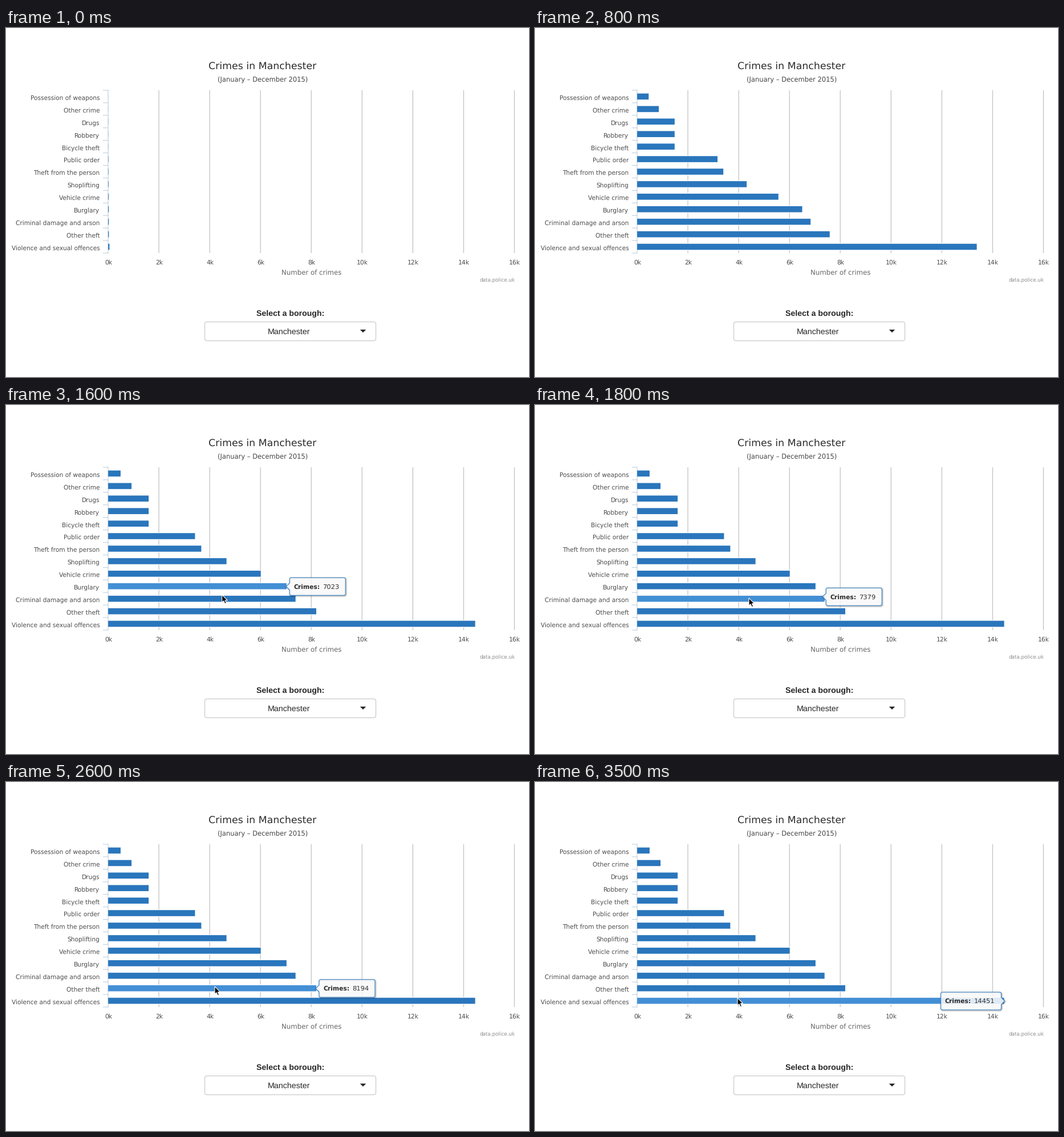
Animation of 917x611 px, one loop 3600 ms. Source, as a matplotlib script:

```python
import numpy as np
import matplotlib.pyplot as plt
from matplotlib.animation import FuncAnimation
from matplotlib.patches import FancyBboxPatch, PathPatch, Polygon, Rectangle
from matplotlib.path import Path

W, H, DPI = 917, 611, 100
STEP, FRAMES = 100, 36
PX = 72 / DPI

LEFT, TOP, BOTTOM = 179.5, 109, 394
UNIT = 89.06 / 2000
BLUE, LIGHT, AXIS = "#2a76bc", "#438fd5", "#c0d0e0"

CRIMES = [
    ("Possession of weapons", 490), ("Other crime", 920), ("Drugs", 1595),
    ("Robbery", 1595), ("Bicycle theft", 1595), ("Public order", 3420),
    ("Theft from the person", 3667), ("Shoplifting", 4660),
    ("Vehicle crime", 6010), ("Burglary", 7023),
    ("Criminal damage and arson", 7379), ("Other theft", 8194),
    ("Violence and sexual offences", 14451),
]
ROW = (BOTTOM - TOP) / len(CRIMES)
BAR_H = 10.6

# (time in ms, hovered row)
HOVERS = [(950, 8), (1010, 9), (1665, 10), (2250, 11), (3050, 12)]
MOUSE_T = [1000, 1200, 1650, 1800, 2250, 2600, 3050, 3500]
MOUSE_X = [386, 384, 378, 375, 370, 366, 358, 355]
MOUSE_Y = [308, 318.5, 334, 338, 355, 358, 377, 378]
ARROW = np.array([(0, 0), (0, 13.4), (3, 10.6), (5.3, 15.6), (7.6, 14.6),
                  (5.4, 9.7), (9.6, 9.7)])

plt.rcParams.update({"font.family": "DejaVu Sans", "text.hinting": "none",
                     "path.snap": False})
fig = plt.figure(figsize=(W / DPI, H / DPI), dpi=DPI, facecolor="white")
ax = fig.add_axes([0, 0, 1, 1])
ax.set(xlim=(0, W), ylim=(H, 0))
ax.axis("off")


def label(x, y, s, size, color, ha="center", **kw):
    return ax.text(x, y, s, fontsize=size * PX, color=color, ha=ha,
                   va="baseline", **kw)


def line(xs, ys, color, width, z):
    ax.plot(xs, ys, color=color, lw=width * PX, zorder=z,
            solid_capstyle="butt")


def row_y(i):
    return TOP + ROW * (i + 0.5)


def bar_end(i):
    return LEFT + CRIMES[i][1] * UNIT


def box_width(i):
    return 98 if CRIMES[i][1] < 10000 else 106


def flipped(i):
    return bar_end(i) + 5 + box_width(i) > 900


def tip_home(i):
    x = bar_end(i) + 5
    if flipped(i):
        x = bar_end(i) - 5 - box_width(i)
    return np.array([x, row_y(i) - 15])


def callout(x, y, w, to_right, h=31, r=3, a=6):
    """Rounded box with a pointer on one side."""
    x2, y2, m = x + w, y + h, y + h / 2
    verts = [(x + r, y), (x2 - r, y), (x2, y), (x2, y + r)]
    codes = [Path.MOVETO, Path.LINETO, Path.CURVE3, Path.CURVE3]
    if to_right:
        verts += [(x2, m - a), (x2 + a, m), (x2, m + a)]
        codes += [Path.LINETO] * 3
    verts += [(x2, y2 - r), (x2, y2), (x2 - r, y2),
              (x + r, y2), (x, y2), (x, y2 - r)]
    codes += [Path.LINETO, Path.CURVE3, Path.CURVE3] * 2
    if not to_right:
        verts += [(x, m + a), (x - a, m), (x, m - a)]
        codes += [Path.LINETO] * 3
    verts += [(x, y + r), (x, y), (x + r, y), (x + r, y)]
    codes += [Path.LINETO, Path.CURVE3, Path.CURVE3, Path.CLOSEPOLY]
    return Path(verts, codes)


# Titles and axes
label(450, 72.6, "Crimes in Manchester", 17.4, "#2b2b2b")
label(450.5, 94, "(January – December 2015)", 11.55, "#444444")
for k in range(9):
    gx = LEFT + k * 89.06
    if k:
        line([gx - 0.5] * 2, [TOP, BOTTOM], "#c3c3c3", 1.3, 1)
    label(gx, 413.8, f"{2 * k}k", 10.7, "#4d4d4d")
label(535.5, 432, "Number of crimes", 11.7, "#666666")
label(892, 444, "data.police.uk", 8.75, "#8c8c8c", "right")

line([LEFT - 0.5] * 2, [TOP - 0.5, BOTTOM + 0.5], AXIS, 1.1, 2)
for i in range(len(CRIMES) + 1):
    line([170, LEFT], [TOP + i * ROW] * 2, AXIS, 1.1, 2)
for i, (name, _) in enumerate(CRIMES):
    label(164.5, row_y(i) + 5.6, name, 10.62, "#4d4d4d", "right")

# Drop-down
label(498.5, 504, "Select a borough:", 14.1, "#262626",
      family="Liberation Sans", weight="bold")
ax.add_patch(FancyBboxPatch((352.5, 518.5), 292, 25,
                            boxstyle="round,pad=4,rounding_size=4",
                            fc="white", ec="#cccccc", lw=1.3 * PX))
label(496.5, 536.2, "Manchester", 14.3, "#262626", family="Liberation Sans")
ax.add_patch(Polygon([(620.8, 528), (631.2, 528), (626, 533.2)],
                     fc="#262626", ec="none"))

# Moving parts
bars, halos = [], []
for i in range(len(CRIMES)):
    y = row_y(i) - BAR_H / 2
    halos.append(ax.add_patch(Rectangle((LEFT, y - 1.2), 0, BAR_H + 2.4,
                                        fc="white", ec="none", zorder=1.5)))
    bars.append(ax.add_patch(Rectangle((LEFT - 0.4, y), 0, BAR_H, fc=BLUE,
                                       ec="none", zorder=3)))

blank = callout(0, 0, 98, False)
shadows = [ax.add_patch(PathPatch(blank, fc="none", ec="black", zorder=5,
                                  alpha=alpha, lw=width * PX))
           for width, alpha in ((5, 0.05), (3, 0.1), (1, 0.15))]
tip_fill = ax.add_patch(PathPatch(blank, fc="#f9f9f9", ec="none", alpha=0.87,
                                  zorder=6))
tip_edge = ax.add_patch(PathPatch(blank, fc="none", ec="#3580c2",
                                  lw=1.1 * PX, zorder=6.1))
tip_key = label(0, 0, "Crimes:", 10.75, "#2b2b2b", "left", weight="bold",
                zorder=7)
tip_num = label(0, 0, "", 11.5, "#333333", "left", zorder=7)
mouse = ax.add_patch(Polygon(ARROW, fc="black", ec="white", lw=1.1 * PX,
                             joinstyle="miter", zorder=9))
tip_parts = [*shadows, tip_fill, tip_edge, tip_key, tip_num, mouse]


def growth(t):
    p = min(1, 0.038 + t / 1018)
    return 0.5 - np.cos(np.pi * p) / 2


def tip_at(t):
    """Hovered row and eased box corner."""
    pos = row = since = None
    for start, i in HOVERS:
        if t < start:
            break
        if row is None:
            pos = tip_home(i)
        else:
            pos = tip_home(row)
        row, since = i, start
    if row is None:
        return None, None
    left = (2 / 3) ** ((t - since) / 32)
    return row, tip_home(row) + (pos - tip_home(row)) * left


def update(n):
    t = n * STEP
    g = growth(t)
    row, corner = tip_at(t)
    for i, (bar, halo) in enumerate(zip(bars, halos)):
        w = CRIMES[i][1] * UNIT * g
        bar.set_width(w)
        halo.set_width(w + 0.8)
        bar.set_facecolor(LIGHT if i == row else BLUE)
    for part in tip_parts:
        part.set_visible(row is not None)
    if row is not None:
        x, y = corner
        w, side = box_width(row), flipped(row)
        for s in shadows:
            s.set_path(callout(x + 1, y + 1, w, side))
        shape = callout(x, y, w, side)
        tip_fill.set_path(shape)
        tip_edge.set_path(shape)
        tip_key.set_position((x + 7.5, y + 19.3))
        tip_num.set_position((x + 58, y + 19.3))
        tip_num.set_text(str(CRIMES[row][1]))
        mouse.set_xy(ARROW + (np.interp(t, MOUSE_T, MOUSE_X),
                              np.interp(t, MOUSE_T, MOUSE_Y)))
    return [*bars, *halos, *tip_parts]


anim = FuncAnimation(fig, update, frames=FRAMES, interval=STEP, repeat=True,
                     repeat_delay=0, blit=False)
plt.show()
```
